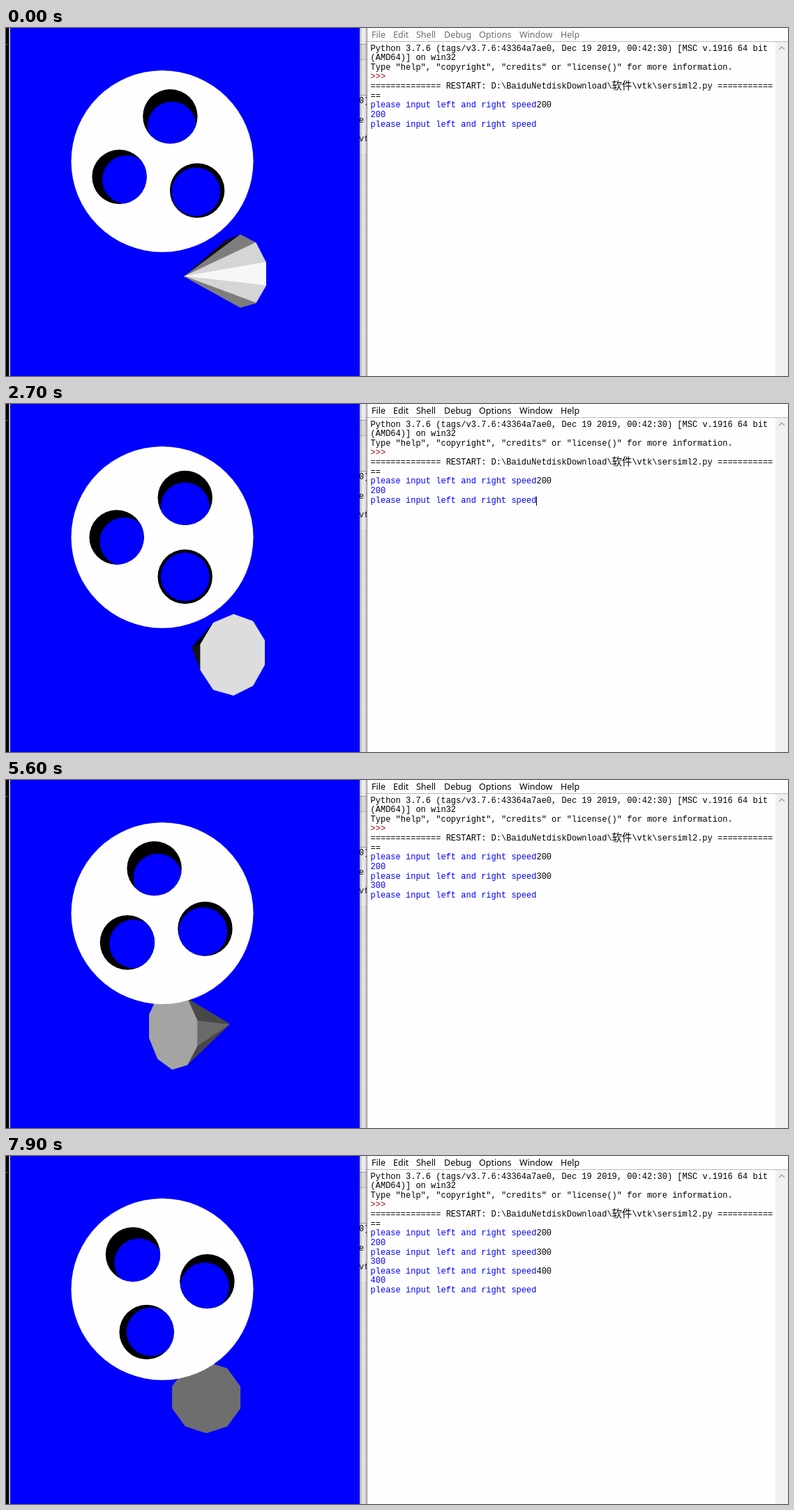
These frames come from a looping animation (1121 by 500 pixels, 8000 ms). An HTML page with a canvas:

```html
<!DOCTYPE html>
<html lang="en">
<head>
<meta charset="utf-8">
<title>Wheel and cone</title>
<style>
html, body { margin: 0; width: 100%; height: 100%; overflow: hidden; background: #fff; }
#stage { position: relative; width: 1121px; height: 500px; overflow: hidden; background: #fefefe; }
#stage > * { position: absolute; }
#scene { left: 0; top: 0; }

#behind { left: 507px; top: 0; width: 11px; height: 500px; overflow: hidden; background: #e4e4e4; }
#behind div { position: absolute; left: 0; width: 11px; }
#behind span { position: absolute; left: -1px; font: 12.02px/14px "Liberation Mono", monospace; color: #111; }
#behind::after { content: ""; position: absolute; inset: 0; background: linear-gradient(90deg, #0004, #0000 4px, #0000 6px, #0003); }

#shell { left: 517px; top: 0; width: 604px; height: 500px; box-sizing: border-box; border-left: 1px solid #8a8a8a; background: #fefefe; }
#menu { left: 518px; top: 0; width: 603px; height: 19px; border-bottom: 1px solid #bcbcbc; color: #6d6d6d;
  font: 12.5px/20px "Noto Sans", "Open Sans", sans-serif; }
#menu.active { color: #000; }
#menu span { position: absolute; top: 0; }
#bar { left: 1103px; top: 20px; width: 18px; height: 480px; background: #f0f0f0; }
#bar svg { position: absolute; left: 4px; top: 5px; }

#log { left: 522.5px; top: 23.5px; margin: 0; color: #000; white-space: pre;
  font: 12.02px/13.63px "Liberation Mono", "DejaVu Sans Mono", monospace; }
#log b { font-weight: normal; color: #00f; }
#log u { text-decoration: none; color: #a00000; }
#log em { font: 14.4px/0 "Noto Sans CJK SC", "Noto Sans CJK", sans-serif; vertical-align: -1px; }
#log i { display: inline-block; width: 1.6px; height: 13.5px; margin: 0 -1.6px 0 -.6px; vertical-align: top; background: #000; }
</style>
</head>
<body>
<div id="stage">
  <canvas id="scene" width="507" height="500"></canvas>
  <div id="behind">
    <div style="top:0;height:23px;background:#f0f0f0;border-bottom:1px solid #a8a8a8"></div>
    <div style="top:24px;height:21px;background:#dcdcdc;border-bottom:1px solid #b0b0b0"></div>
    <div style="top:96px;height:83px;background:#ececec;border-top:1px solid #a0a0a0"></div>
    <span style="top:98px">0)</span>
    <span style="top:126px">e</span>
    <span style="top:153px">vt</span>
  </div>
  <div id="shell"></div>
  <div id="menu">
    <span style="left:6px">File</span><span style="left:37px">Edit</span>
    <span style="left:70px">Shell</span><span style="left:110px">Debug</span>
    <span style="left:160px">Options</span><span style="left:218px">Window</span>
    <span style="left:277px">Help</span>
  </div>
  <div id="bar"><svg width="10" height="8" fill="none" stroke="#a8a8a8" stroke-width="1.5"><path d="M1 6L5 2L9 6"/></svg></div>
  <pre id="log">Python 3.7.6 (tags/v3.7.6:43364a7ae0, Dec 19 2019, 00:42:30) [MSC v.1916 64 bit
(AMD64)] on win32
Type "help", "copyright", "credits" or "license()" for more information.
<u>&gt;&gt;&gt; </u>
============== RESTART: D:\BaiduNetdiskDownload\<em>软件</em>\vtk\sersiml2.py ===========
==
<span id="session"></span></pre>
</div>
<script>
const LOOP = 8000, TICK = 100, RAD = Math.PI / 180;
const ctx = document.getElementById('scene').getContext('2d');
const menu = document.getElementById('menu');
const session = document.getElementById('session');

// Camera: vanishing point, focal length in pixels, distance to the cone's pivot
const VX = 257, VY = 250, FOCAL = 933, DIST = 17.1;

const project = ([x, y, z]) => {
  const s = FOCAL / (DIST - z);
  return [VX + (0.59 + x) * s, VY + (1.9 + y) * s];
};

function fillFace(points, light) {
  const p = points.map(project);
  let area = 0;
  p.forEach(([x, y], i) => {
    const [nx, ny] = p[(i + 1) % p.length];
    area += x * ny - nx * y;
  });
  if (area <= 0) return;
  const g = Math.round(255 * Math.min(1, Math.abs(light)));
  ctx.fillStyle = ctx.strokeStyle = `rgb(${g},${g},${g})`;
  // The outline closes the seams between neighbouring faces
  ctx.lineWidth = 1;
  ctx.lineJoin = 'round';
  ctx.beginPath();
  p.forEach(q => ctx.lineTo(...q));
  ctx.closePath();
  ctx.fill();
  ctx.stroke();
}

// Ten-sided cone, height 2, radius 1, turning about the vertical axis
function drawCone(deg) {
  const s = Math.sin(deg * RAD), c = Math.cos(deg * RAD);
  const at = (along, a, r) => {
    const u = r * Math.cos(a * RAD), v = r * Math.sin(a * RAD);
    return [along * s + u * c, v, along * c - u * s];
  };
  const tip = at(0.8, 0, 0);
  const rim = Array.from({ length: 10 }, (_, i) => at(-1.2, 90 + 36 * i, 1));
  const apothem = Math.cos(18 * RAD), slant = Math.hypot(2, apothem);
  rim.forEach((p, i) => {
    const normal = at(apothem / slant, 108 + 36 * i, 2 / slant);
    fillFace([tip, p, rim[(i + 1) % 10]], normal[2]);
  });
  fillFace([...rim].reverse(), c);
}

function disc(x, y, r, color) {
  ctx.fillStyle = color;
  ctx.beginPath();
  ctx.arc(x, y, r, 0, 2 * Math.PI);
  ctx.fill();
}

function drawWheel(deg) {
  const depth = 0.89;
  disc(224, 191.5, 130.5, '#fefefe');
  for (let i = 0; i < 3; i++) {
    const a = (deg + 120 * i) * RAD;
    const x = 224 + 65.4 * Math.cos(a), y = 191.5 + 65.4 * Math.sin(a);
    disc(x, y, 39.2, '#000');
    ctx.save();
    ctx.clip();
    disc(VX + (x - VX) * depth, VY + (y - VY) * depth, 39.2 * depth, '#00f');
    ctx.restore();
  }
}

function drawScene(steps) {
  const bands = [[0, 4, '#000'], [4, 1, '#8c8c94'], [5, 1, '#d4d4e0'], [6, 501, '#00f']];
  for (const [x, w, color] of bands) {
    ctx.fillStyle = color;
    ctx.fillRect(x, 0, w, 500);
  }
  ctx.fillStyle = '#555';
  ctx.fillRect(0, 23, 5, 1);
  drawCone(-50 + 10 * steps);
  // Each entered speed makes the wheel turn 20 degrees more per step
  drawWheel(40 + 10 * steps + 20 * Math.max(0, steps - 40) + 20 * Math.max(0, steps - 71));
}

// Short stalls while the second speed is taken in
function stepsAt(tick) {
  if (tick <= 41) return Math.max(0, tick - 1);
  return tick - 2 - (tick === 45);
}

const ENTERED = [[0, '200'], [4100, '300'], [7300, '400']];
const KEYS = [[3000, '3'], [3100, '30'], [3300, '300'], [4100, ''],
  [6200, '4'], [6400, '40'], [6500, '400'], [7300, '']];
const CURSOR_ON = [[1400, 2000], [2300, 2900], [3000, 3700], [4100, 4600],
  [4800, 5400], [5700, 6000], [6200, 7200], [7300, 7800]];
const PROMPT = '<b>please input left and right speed</b>';

function sessionAt(t) {
  const past = ENTERED.filter(([at]) => t >= at)
    .map(([, v]) => `${PROMPT}${v}\n<b>${v}</b>\n`).join('');
  const typed = KEYS.reduce((text, [at, v]) => t >= at ? v : text, '');
  const cursor = CURSOR_ON.some(([on, off]) => t >= on && t < off) ? '<i></i>' : '';
  return past + PROMPT + typed + cursor;
}

let shown = -1;
const start = performance.now();
function frame() {
  const tick = Math.floor((performance.now() - start) % LOOP / TICK);
  if (tick !== shown) {
    shown = tick;
    const t = tick * TICK;
    drawScene(stepsAt(tick));
    menu.className = t >= 1400 ? 'active' : '';
    session.innerHTML = sessionAt(t);
  }
  requestAnimationFrame(frame);
}
frame();
</script>
</body>
</html>
```
